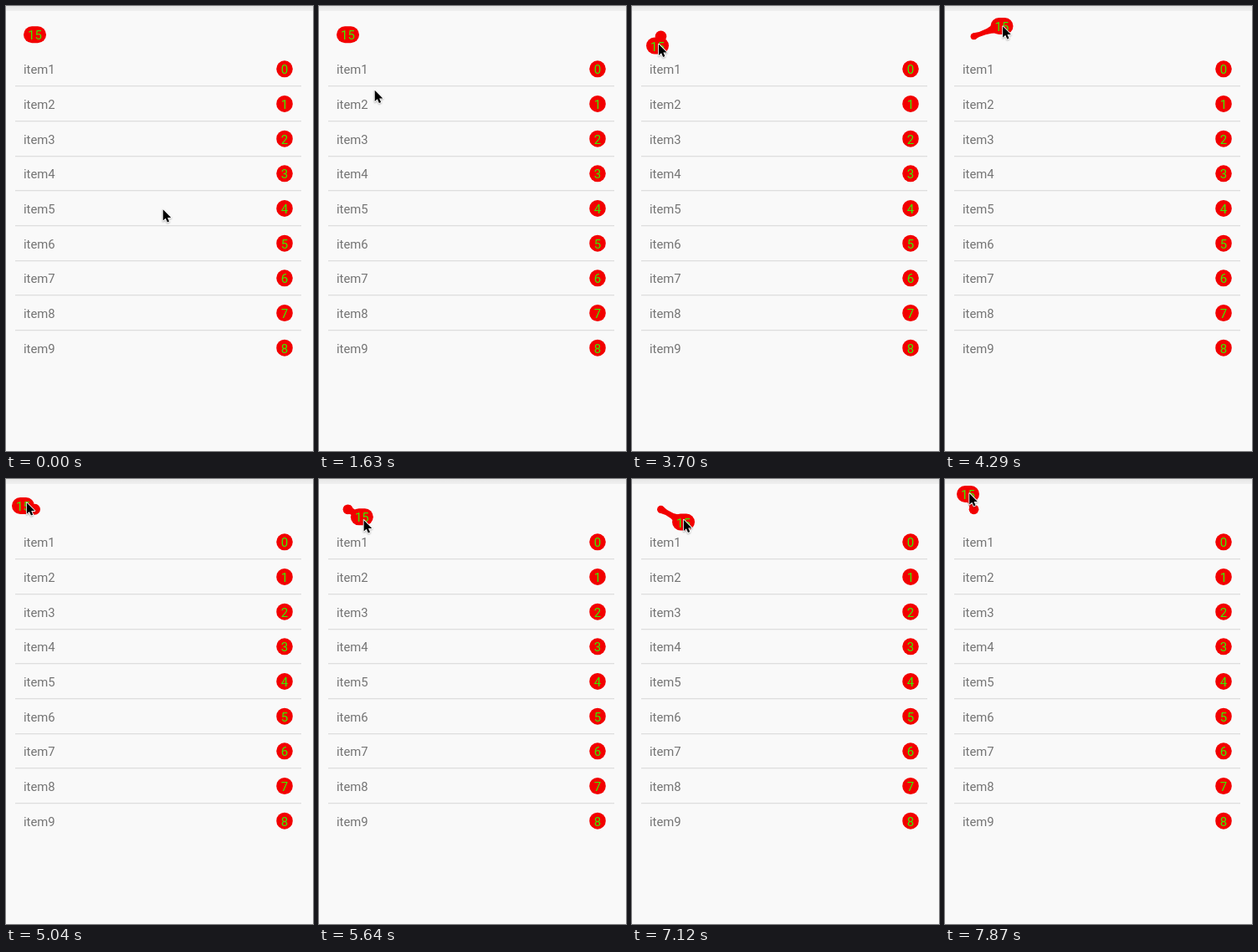
Animation, 367 px wide and 532 px high, one loop 8000 ms. Source, as an HTML page with a canvas:

```html
<!DOCTYPE html>
<html lang="en">
<head>
<meta charset="utf-8">
<title>Draggable badges</title>
<style>
  html, body { margin: 0; width: 100%; height: 100%; overflow: hidden; background: #f9f9f9; }
  canvas { display: block; width: 367px; height: 532px; }
</style>
</head>
<body>
<canvas id="stage"></canvas>
<script>
const W = 367, H = 532, LOOP = 8000;
const canvas = document.getElementById('stage');
const ctx = canvas.getContext('2d');
const ratio = window.devicePixelRatio || 1;
canvas.width = W * ratio;
canvas.height = H * ratio;

const RED = '#f20000', GREEN = '#3af000';
const FONT = 'px Roboto, sans-serif';
const HOME = [34.5, 34.3], ANCHOR = [34.5, 36.3];
const REACH = 40;                 // the band snaps beyond this distance
const FIRST = 880, STEP = 148.3;  // the screen refreshes in steps
const GRAB = 17;                  // step at which the badge is picked up
const LEAD = 0.25;                // the pointer runs ahead of the badge

// Turning points of the hand: step, x, y
const path = [
  [-0.75, 186, 244], [3, 79, 152], [4.25, 79, 152], [5.25, 65, 101.5],
  [9, 37, 34], [13, 35, 36], [16, 35, 47],
  [19, 30.5, 47.5], [21, 30, 24], [23, 68, 24], [25, 47, 49],
  [27, 18, 44], [28, 20.5, 32], [30, 45, 12], [33, 55, 57],
  [36, 80.5, 48.5], [38, 112, 58], [40, 92, 83],
  [42, 61.5, 51.5], [44, 61, 44], [46, 45.5, 18], [47, 27.5, 18]
];

// Slope at a key point; flat where the direction turns
function slope(i, c) {
  const a = path[i - 1], b = path[i], d = path[i + 1];
  if (!a || !d || (b[c] - a[c]) * (d[c] - b[c]) <= 0) return 0;
  return (d[c] - a[c]) / (d[0] - a[0]);
}

function hand(n) {
  const last = path.length - 1;
  n = Math.min(Math.max(n, path[0][0]), path[last][0]);
  let i = 0;
  while (i < last - 1 && path[i + 1][0] < n) i++;
  const a = path[i], b = path[i + 1], w = b[0] - a[0], u = (n - a[0]) / w;
  const ease = u * u * (3 - 2 * u);
  return [1, 2].map(c => a[c] + (b[c] - a[c]) * ease
    + w * u * (1 - u) * ((1 - u) * slope(i, c) - u * slope(i + 1, c)));
}

function badge(label, x, y, w) {
  const h = 20;
  ctx.fillStyle = RED;
  ctx.beginPath();
  ctx.roundRect(x - w / 2, y - h / 2, w, h, Math.min(w, h) / 2);
  ctx.fill();
  ctx.fillStyle = GREEN;
  ctx.font = 15 + FONT;
  ctx.textAlign = 'center';
  ctx.fillText(label, x, y + 6);
}

function band([x, y]) {
  const [ax, ay] = ANCHOR;
  const dx = x - ax, dy = y - ay, d = Math.hypot(dx, dy);
  if (d > REACH) return;
  const r = 8.2 - 0.12 * d, R = 9.5;
  ctx.fillStyle = RED;
  ctx.beginPath();
  ctx.arc(ax, ay, r, 0, Math.PI * 2);
  ctx.fill();
  if (d < 1) return;
  const nx = -dy / d, ny = dx / d;
  const mx = (ax + x) / 2, my = (ay + y) / 2;
  ctx.beginPath();
  ctx.moveTo(ax + nx * r, ay + ny * r);
  ctx.quadraticCurveTo(mx, my, x + nx * R, y + ny * R);
  ctx.lineTo(x - nx * R, y - ny * R);
  ctx.quadraticCurveTo(mx, my, ax - nx * r, ay - ny * r);
  ctx.fill();
}

const arrow = new Path2D('M0 0V15.6L3.6 12.3L6 17.8L8.6 16.7L6.3 11.3H11.2Z');

function pointer([x, y]) {
  ctx.save();
  ctx.translate(x + 1.2, y - 1.8);
  ctx.translate(0.5, 1);
  ctx.scale(0.86, 0.86);
  ctx.lineJoin = 'round';
  ctx.lineWidth = 2;
  ctx.strokeStyle = '#fff';
  ctx.shadowColor = 'rgba(0,0,0,.3)';
  ctx.shadowBlur = 2 * ratio;
  ctx.shadowOffsetY = ratio;
  ctx.stroke(arrow);
  ctx.shadowColor = 'transparent';
  ctx.fillStyle = '#000';
  ctx.fill(arrow);
  ctx.restore();
}

function list() {
  ctx.fillStyle = '#f9f9f9';
  ctx.fillRect(0, 0, W, H);
  const bar = ctx.createLinearGradient(0, 0, 0, 6);
  bar.addColorStop(0, '#e6e6e6');
  bar.addColorStop(1, '#f0f0f0');
  ctx.fillStyle = bar;
  ctx.fillRect(0, 0, W, 6);

  for (let i = 0; i < 9; i++) {
    const y = 75.3 + i * 41.67;
    ctx.fillStyle = '#737373';
    ctx.font = 14.8 + FONT;
    ctx.textAlign = 'left';
    ctx.fillText('item' + (i + 1), 21, y + 6);
    if (i < 8) {
      ctx.fillStyle = '#dedede';
      ctx.fillRect(11, Math.round(y + 20), 342, 1.3);
    }
    badge(String(i), 333, y, 19.5);
  }
}

function draw(t) {
  ctx.setTransform(ratio, 0, 0, ratio, 0, 0);
  list();
  const n = Math.floor((t - FIRST) / STEP);
  const held = n >= GRAB;
  const spot = held ? hand(n) : HOME;
  if (held) band(spot);
  badge('15', ...spot, 27);
  pointer(hand(n + LEAD));
}

const start = performance.now();
function loop() {
  draw((performance.now() - start) % LOOP);
  requestAnimationFrame(loop);
}
loop();
</script>
</body>
</html>
```
